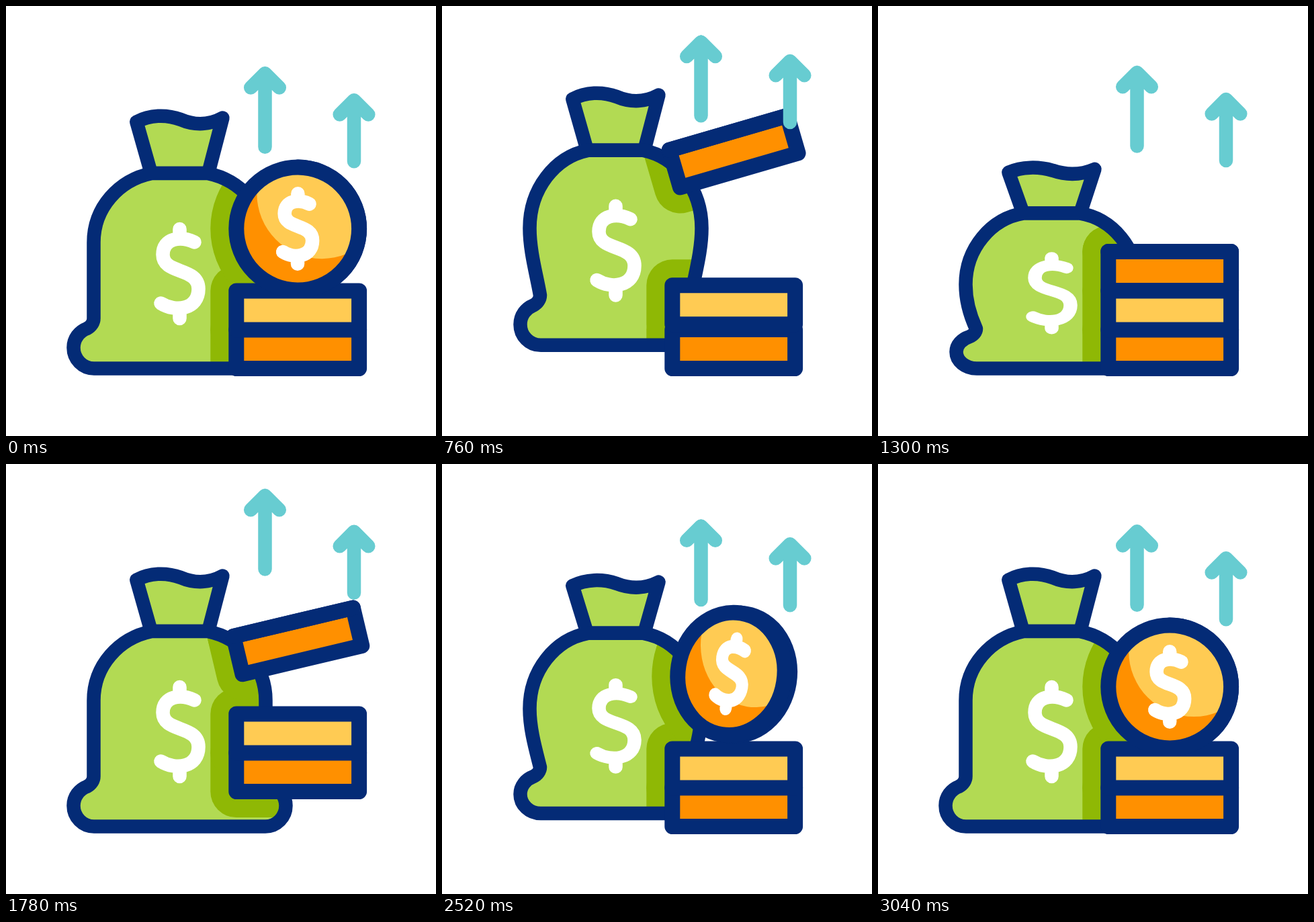
An HTML page with a canvas that plays this animation: 640 px wide and 640 px high, repeating every 3200 ms.

```html
<!DOCTYPE html>
<html lang="en">
<head>
<meta charset="utf-8">
<title>Growing savings</title>
<style>
html, body { margin: 0; width: 100%; height: 100%; overflow: hidden; background: #fff; }
canvas { display: block; width: 100vmin; height: 100vmin; }
</style>
</head>
<body>
<canvas id="stage" width="640" height="640"></canvas>
<script>
const ctx = document.getElementById('stage').getContext('2d');
const LOOP = 3200;
const NAVY = '#042b76', LIME = '#b2da53', MOSS = '#8fb805';
const YELLOW = '#ffcb53', ORANGE = '#ff9000', TEAL = '#67ccd1';
const LINE = 20.5, RIM = 23, SHADE = 77;
const R = 91.4, CX = 434.2, THICK = 58, GROUND = 539.5;
const SWING = 720, SECOND_TOSS = 1460;

// Eased step from 0 to 1 between a and b.
function ramp(t, a, b) {
  const u = Math.min(1, Math.max(0, (t - a) / (b - a)));
  return u * u * (3 - 2 * u);
}

// Eased rise from a to the peak, then back down until b.
const pulse = (t, a, peak, b) => ramp(t, a, peak) - ramp(t, peak, b);

function arrowLift(t, first) {
  const again = first + SWING;
  return 63 * (pulse(t, 0, first, again) + pulse(t, again, again + SWING, again + 2 * SWING));
}

function stackLift(t, fall) {
  const toss = start => pulse(t, start, start + 320, start + 320 + fall);
  return 52 * (toss(0) + toss(SECOND_TOSS));
}

// The first toss turns the coin from face-on to flat, the second turns it back.
function coinPose(t) {
  const onTop = ramp(t, 620, 1120) - ramp(t, SECOND_TOSS, 2030);
  const standing = 1 - ramp(t, 0, 620) + ramp(t, 2030, 2655);
  const settle = Math.exp(-t / 444) * (1 - ramp(t, 760, 1120));
  return {
    y: 174 + 220.5 * onTop + 157.5 * standing,
    tilt: -Math.PI / 2 * (settle + ramp(t, SECOND_TOSS, 2780)),
    open: 1 - ramp(t, 0, 620) + ramp(t, 1780, 2740)
  };
}

function bagPose(t) {
  const crouch = pulse(t, 0, 460, 780) + pulse(t, 1900, 2360, 2660);
  const landing = pulse(t, 1040, 1290, 1720) + 0.6 * pulse(t, 2780, 2900, 3040);
  return {
    hop: 35 * (pulse(t, 460, 780, 1060) + pulse(t, 2360, 2660, 2800)),
    tall: 1 - 0.172 * crouch - 0.205 * landing,
    pinch: ramp(t, 0, 600) - ramp(t, 1540, 1740) + ramp(t, 1900, 2500) - ramp(t, 2800, 3040)
  };
}

function stroke(path, color, width) {
  ctx.strokeStyle = color;
  ctx.lineWidth = width;
  ctx.stroke(path);
}

function fill(path, color) {
  ctx.fillStyle = color;
  ctx.fill(path);
}

function paint(path, color, line, width) {
  fill(path, color);
  stroke(path, line, width);
}

const dollar = new Path2D(
  'M0-66.5V-54M0 54V66.5' +
  'M22-47C1.5-56.5-25-53.5-25-28.5C-25 1.5 28 -10.5 28 22.5C28 53.5-6.5 57.5-28 44');

function drawArrow(x, top, length) {
  const p = new Path2D(), barb = 21.3;
  p.moveTo(x, top + length);
  p.lineTo(x, top);
  p.moveTo(x - barb, top + barb);
  p.lineTo(x, top);
  p.lineTo(x + barb, top + barb);
  stroke(p, TEAL, LINE);
}

function slab(y) {
  const p = new Path2D();
  p.rect(CX - R, y - THICK / 2, 2 * R, THICK);
  return p;
}

// Draws in a frame whose x axis is the coin's own axle.
function inCoinFrame({ y, tilt, open }, draw) {
  const h = THICK * (1 - open) / 2, rx = R * open, q = Math.PI / 2;
  const side = new Path2D(), face = new Path2D();
  side.moveTo(-h, -R);
  side.lineTo(h, -R);
  side.ellipse(h, 0, rx, R, 0, -q, q);
  side.lineTo(-h, R);
  side.ellipse(-h, 0, rx, R, 0, q, -q, true);
  side.closePath();
  face.ellipse(-h, 0, rx, R, 0, 0, 4 * q);
  ctx.save();
  ctx.translate(CX, y);
  ctx.rotate(tilt + q);
  draw(side, face, h);
  ctx.restore();
}

function drawCoin(coin) {
  inCoinFrame(coin, (side, face, h) => {
    paint(side, ORANGE, NAVY, RIM);
    if (coin.open > 0.25) {
      ctx.save();
      fill(face, ORANGE);
      ctx.clip(face);
      ctx.translate(-h, 0);
      ctx.scale(coin.open, 1);
      const glow = new Path2D();
      glow.arc(36, -52.5, 97, 0, 7);
      fill(glow, YELLOW);
      ctx.scale(0.785, 0.785);
      stroke(dollar, '#fff', LINE / 0.785);
      ctx.restore();
    }
    stroke(face, NAVY, RIM);
  });
}

function bagBody(Y, { tall, pinch }) {
  const p = new Path2D();
  const squash = 1 - tall, sag = 13 * pinch + 55 * squash;
  const wide = Y(352) + sag, join = Y(465), run = join - wide;
  const jx = 130.5 + 15.5 * pinch, foot = 100.5 + 16 * pinch;
  // One half runs from collar to base and is mirrored back up.
  const half = [
    [[168, Y(259)], [130.5, Y(300) + sag / 2], [130.5, wide]],
    [[130.5, wide + run * 0.35], [jx - 5 * pinch - 20 * squash, join - run * 0.3], [jx, join]],
    [[jx, Y(471)], [jx - 4, Y(477)], [jx - 10, Y(480)]],
    [[foot + 8.5, Y(484.5)], [foot, Y(495)], [foot, Y(508.5)]],
    [[foot, Y(525.5)], [foot + 13.5, Y(GROUND)], [foot + 30.5, Y(GROUND)]]
  ];
  const flip = ([x, y]) => [517 - x, y];
  const start = [217, Y(249)];
  p.moveTo(...start);
  for (const c of half) p.bezierCurveTo(...c.flat());
  p.lineTo(...flip(half[4][2]));
  for (let i = 4; i >= 0; i--) {
    const [a, b] = half[i], end = i ? half[i - 1][2] : start;
    p.bezierCurveTo(...flip(b), ...flip(a), ...flip(end));
  }
  p.closePath();
  return p;
}

function bagNeck(Y) {
  const p = new Path2D();
  p.moveTo(216, Y(249));
  p.lineTo(194.3, Y(172.5));
  p.bezierCurveTo(214, Y(162), 238, Y(161), 260, Y(169));
  p.bezierCurveTo(282, Y(178.5), 304, Y(176.5), 322.5, Y(166.5));
  p.lineTo(301, Y(249));
  p.closePath();
  return p;
}

function drawBag(bag, coin, slabs) {
  const Y = y => GROUND - bag.hop - (GROUND - y) * bag.tall;
  const neck = bagNeck(Y), body = bagBody(Y, bag);
  const shade = p => paint(p, MOSS, MOSS, SHADE);
  paint(neck, LIME, NAVY, LINE);
  fill(body, LIME);

  ctx.save();
  ctx.clip(body);
  slabs.forEach(shade);
  inCoinFrame(coin, (side, face) => [side, face].forEach(shade));
  ctx.restore();

  stroke(body, NAVY, LINE);
  ctx.save();
  ctx.translate(258.5, Y(398.5));
  ctx.scale(1, bag.tall);
  stroke(dollar, '#fff', LINE);
  ctx.restore();
}

function frame(t) {
  ctx.fillStyle = '#fff';
  ctx.fillRect(0, 0, 640, 640);
  ctx.lineCap = ctx.lineJoin = 'round';

  const coin = coinPose(t);
  const low = slab(510.6 - stackLift(t, 390)), mid = slab(453 - stackLift(t, 590));
  drawBag(bagPose(t), coin, [low, mid]);
  paint(low, ORANGE, NAVY, RIM);
  paint(mid, YELLOW, NAVY, RIM);
  drawCoin(coin);

  const lastPush = 58 * pulse(t, 2680, 2850, 3040);
  drawArrow(385.5, 100.3 - arrowLift(t, 520) - lastPush, 109.5);
  drawArrow(518, 140.3 - arrowLift(t, 640), 91);
}

const begin = performance.now();
function tick() {
  frame((performance.now() - begin) % LOOP);
  requestAnimationFrame(tick);
}
tick();
</script>
</body>
</html>
```
